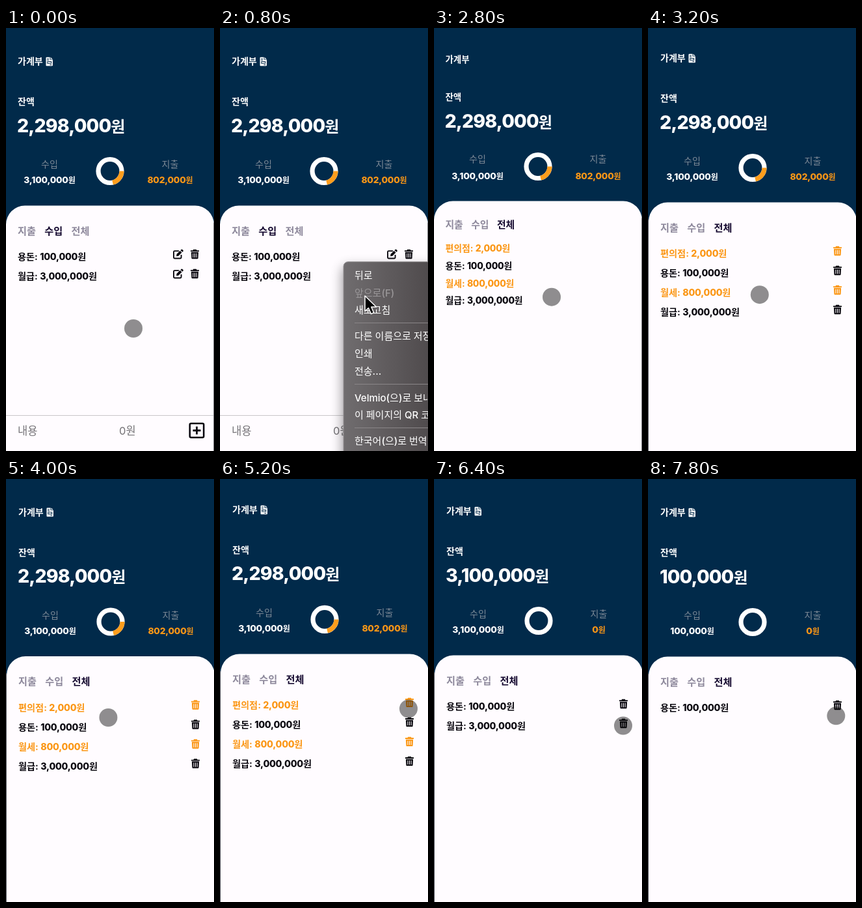
Recreate the animation shown at these times as an HTML page. Size 320 px wide and 649 px high, loop 8000 ms.

```html
<!DOCTYPE html>
<html lang="ko">
<head>
<meta charset="utf-8">
<title>가계부</title>
<style>
  html, body { margin: 0; width: 100%; height: 100%; overflow: hidden; background: #012a4a; }
  svg { display: block; width: 100%; height: 100%; }
  text { font-family: Inter, "Noto Sans CJK KR", "Noto Sans CJK", sans-serif; font-weight: 700; }
  .num { font-weight: 800; letter-spacing: -0.015em; }
  .big .num { letter-spacing: -0.03em; }
  .thin { font-weight: 400; }
  .mid { text-anchor: middle; }
  .menu text { font-size: 15px; font-weight: 500; }
</style>
</head>
<body>
<svg id="stage" viewBox="0 0 320 649" preserveAspectRatio="none"></svg>
<script>
const LOOP = 8000, STEP = 200;
const NAVY = '#012a4a', ORANGE = '#fb9716', PAPER = '#fffcff', INK = '#0b0910';
const stage = document.getElementById('stage');

// Tracks are lists of [time, ...values], linear between entries.
const TOUCH = [[0, 196, 461], [200, 194, 420], [400, 190, 360], [1600, 226, 434], [2600, 190, 415],
  [2800, 181, 412.7], [3800, 158, 404], [4000, 157.4, 366], [4800, 285, 354], [5200, 290, 352.5],
  [5600, 290, 352.5], [5800, 291, 378.5], [6600, 291, 378.5], [6800, 290, 387], [7600, 290, 387], [7800, 289.3, 363.3]];
const POINTER = [[600, 192, 361], [800, 223, 411], [1000, 224, 427], [1400, 226, 434]];
const SCROLL = [[0, 0], [3000, 0], [3200, -5], [3400, -2], [3600, -.5], [4800, -.5], [5000, -7],
  [5200, -4.1], [5400, -2], [5600, 0], [6200, 0], [6400, -2], [6600, -2], [6800, 0]];

const ITEMS = [
  { name: '편의점', sum: 2000, out: true, gone: 5600 },
  { name: '용돈', sum: 100000, gone: Infinity },
  { name: '월세', sum: 800000, out: true, gone: 6200 },
  { name: '월급', sum: 3000000, gone: 7200 }
];

// Vertical centres of each part, with icons and before they have loaded.
const FULL = { x: 18, title: 51, label: 113, total: 149, kind: 209, sum: 233, ring: 219.5, sheet: 272.6,
  tabs: 311, tab: 15.2, tabGap: 41.3, rows: 351, gap: 30, size: 14.2, head: 14, won: 24 };
const BARE = { x: 17.5, title: 48, label: 106, total: 142.5, kind: 201, sum: 226.5, ring: 212.5, sheet: 265.6,
  tabs: 302, tab: 14.8, tabGap: 39.7, rows: 338, gap: 26.7, size: 13.85, head: 13.4, won: 23 };

function track(keys, t) {
  let i = keys.length - 1;
  while (i > 0 && keys[i][0] > t) i--;
  const a = keys[i], b = keys[i + 1];
  if (!b || t <= a[0]) return a.slice(1);
  const k = (t - a[0]) / (b[0] - a[0]);
  return a.slice(1).map((v, n) => v + (b[n + 1] - v) * k);
}

const comma = n => n.toLocaleString('en-US');
const total = list => list.reduce((s, item) => s + item.sum, 0);
const text = (x, y, size, fill, body, cls = '') =>
  `<text x="${x}" y="${y + size * .37}" font-size="${size}" fill="${fill}" class="${cls}">${body}</text>`;
const rect = (x, y, w, h, fill, more = '') =>
  `<rect x="${x}" y="${y}" width="${w}" height="${h}" fill="${fill}" ${more}/>`;
const money = (n, won) => `<tspan class="num">${comma(n)}</tspan><tspan font-size="${won}">원</tspan>`;
const at = (x, y, body) => `<g transform="translate(${x} ${y})">${body}</g>`;

const trash = (x, y, fill) => at(x, y, `<path fill="${fill}" fill-rule="evenodd"
  d="M-6.5-5.8h3.4l.8-1.4h4.6l.8 1.4h3.4v1.8h-13zM-5.6-3.2h11.2l-.5 9.2q-.1 1.2-1.3 1.2h-7.6q-1.2 0-1.3-1.2z
  M-3.1-1.2v6.4h1v-6.4zM-.5-1.2v6.4h1v-6.4zM2.1-1.2v6.4h1v-6.4z"/>`);

const pencil = (x, y) => at(x, y, `<path d="M1-4.9h-6.6q-1.4 0-1.4 1.4v8.6q0 1.4 1.4 1.4h8.8q1.4 0 1.4-1.4v-4.1"
  fill="none" stroke="${INK}" stroke-width="1.9"/>
  <path d="M-2.9 3.2l.4-3.2 5.2-5.2 2.8 2.8-5.2 5.2zM3.5-6l1-1q1-.9 2 0l1 1q.8.9 0 1.8l-1.1 1z" fill="${INK}"/>`);

const receipt = (x, y) => at(x, y, `<path fill="#fff" fill-rule="evenodd"
  d="M-5.2-5.8q0-1 1-1h5v3.8h4.4v8.8q0 1-1 1h-8.4q-1 0-1-1zM1.8-6.8l3.2 3h-3.2z
  M-3.6-4.8v1h2.8v-1zM-3.6-2.7v1h2.8v-1zM-3.4-.4v3.6h6.8v-3.6zM-2.4.6v1.6h4.8v-1.6zM.6 4.5v1h2.8v-1z"/>`);

function ring(cy, share) {
  const r = 18, len = 2 * Math.PI * r;
  const arc = share ? `<circle cx="160" cy="${cy}" r="${r}" fill="none" stroke="#ff9d1c" stroke-width="7"
    stroke-dasharray="${len * (share + .006)} ${len}"/>` : '';
  return `<circle cx="160" cy="${cy}" r="${r}" fill="none" stroke="#fff" stroke-width="7.2"/>` + arc;
}

function header(p, list, icons) {
  const income = total(list.filter(i => !i.out)), spent = total(list.filter(i => i.out));
  return text(p.x, p.title, p.head, '#fff', '가계부') +
    (icons ? receipt(66.7, p.title + .5) : '') +
    text(p.x, p.label, p.head, '#fff', '잔액') +
    text(p.x - 1, p.total, 28.5, '#fff', money(income - spent, p.won), 'big') +
    text(67, p.kind, 14, '#7d8996', '수입', 'thin mid') +
    text(67, p.sum, 13.8, '#fff', money(income, 12), 'mid') +
    text(252.5, p.kind, 14, '#7d8996', '지출', 'thin mid') +
    text(252.5, p.sum, 13.8, ORANGE, money(spent, 12), 'mid') +
    ring(p.ring, spent / (income + spent));
}

function sheet(p, list, tab, icons) {
  let out = `<path d="M0 700V${p.sheet + 29}a29 29 0 0 1 29-29H291a29 29 0 0 1 29 29V700z" fill="${PAPER}"/>`;
  ['지출', '수입', '전체'].forEach((name, i) => {
    out += text(p.x + i * p.tabGap, p.tabs, p.tab, i === tab ? '#160a30' : '#8e899c', name);
  });
  list.forEach((item, i) => {
    const y = p.rows + i * p.gap, fill = item.out ? ORANGE : INK;
    out += text(p.x, y, p.size, fill, `${item.name}: ${money(item.sum, p.size)}`);
    if (icons) out += trash(290.5, y - 4, fill);
    if (tab === 1) out += pencil(265, y - 4);
  });
  return out;
}

const entryBar = () => rect(0, 594, 319, 1, '#c9c7ca') +
  text(18, 618, 16.5, '#737175', '내용', 'thin') +
  text(174, 618, 16.5, '#737175', '0원', 'thin') +
  rect(282.8, 606.8, 21.4, 21.4, 'none', `rx="2" stroke="${INK}" stroke-width="2.6"`) +
  `<path d="M293.5 611.5v12M287.5 617.5h12" stroke="${INK}" stroke-width="2.8"/>`;

function menu() {
  const rows = [[379, '뒤로'], [406, '앞으로(F)'], [432, '새로고침'], [472, '다른 이름으로 저장...'],
    [499, '인쇄'], [526, '전송...'], [567, 'Velmio(으)로 보내기'], [593, '이 페이지의 QR 코드 만들기'],
    [633, '한국어(으)로 번역']];
  return `<defs><linearGradient id="glass"><stop stop-color="#706d6f"/><stop offset="1" stop-color="#4b4648"/></linearGradient>
    <filter id="soft" x="-30%" y="-20%" width="160%" height="140%"><feGaussianBlur stdDeviation="9"/></filter></defs>` +
    rect(188, 366, 160, 320, '#000', 'rx="8" opacity=".4" filter="url(#soft)"') +
    rect(190, 358.7, 150, 320, 'url(#glass)', 'rx="7" stroke="#979496"') +
    '<g class="menu">' +
    rows.map(([y, name], i) => text(207, y, 15, i === 1 ? '#9a9799' : '#fff', name)).join('') +
    [452, 546, 613].map(y => rect(207, y, 113, 1, '#8a8688')).join('') + '</g>';
}

const arrow = ([x, y]) => at(x, y, `<path d="M0 0V23.5L5.4 18.6 9.4 27.6 13.6 25.8 9.8 17H17.5z"
  fill="#000" stroke="#fff" stroke-width="1.5" stroke-linejoin="round"/>`);

function draw(t) {
  const reloaded = t >= 2600, icons = !reloaded || t >= 3200, menuOpen = t >= 600 && t < 1600;
  const p = icons ? FULL : BARE, shift = reloaded && icons ? 1 : 0;
  const list = ITEMS.filter(i => t < i.gone);
  const shown = reloaded ? list : list.filter(i => !i.out);
  const [dy] = track(SCROLL, t);
  let out = rect(0, 0, 320, 649, NAVY) +
    at(shift, dy, header(p, list, icons) + sheet(p, shown, reloaded ? 2 : 1, icons));
  out += rect(shift ? 0 : 319, p.sheet + dy + 26, 1, 400, shift ? '#5c5e66' : '#89888d');
  if (!reloaded) out += entryBar();
  if (menuOpen) {
    out += menu() + arrow(track(POINTER, t));
  } else {
    const [x, y] = track(TOUCH, t);
    out += `<circle cx="${x}" cy="${y}" r="14" fill="#000" opacity=".44"/>`;
  }
  stage.innerHTML = out;
}

let last = -1;
function tick() {
  const t = Math.floor(performance.now() % LOOP / STEP) * STEP;
  if (t !== last) draw(last = t);
  requestAnimationFrame(tick);
}
tick();
</script>
</body>
</html>
```
